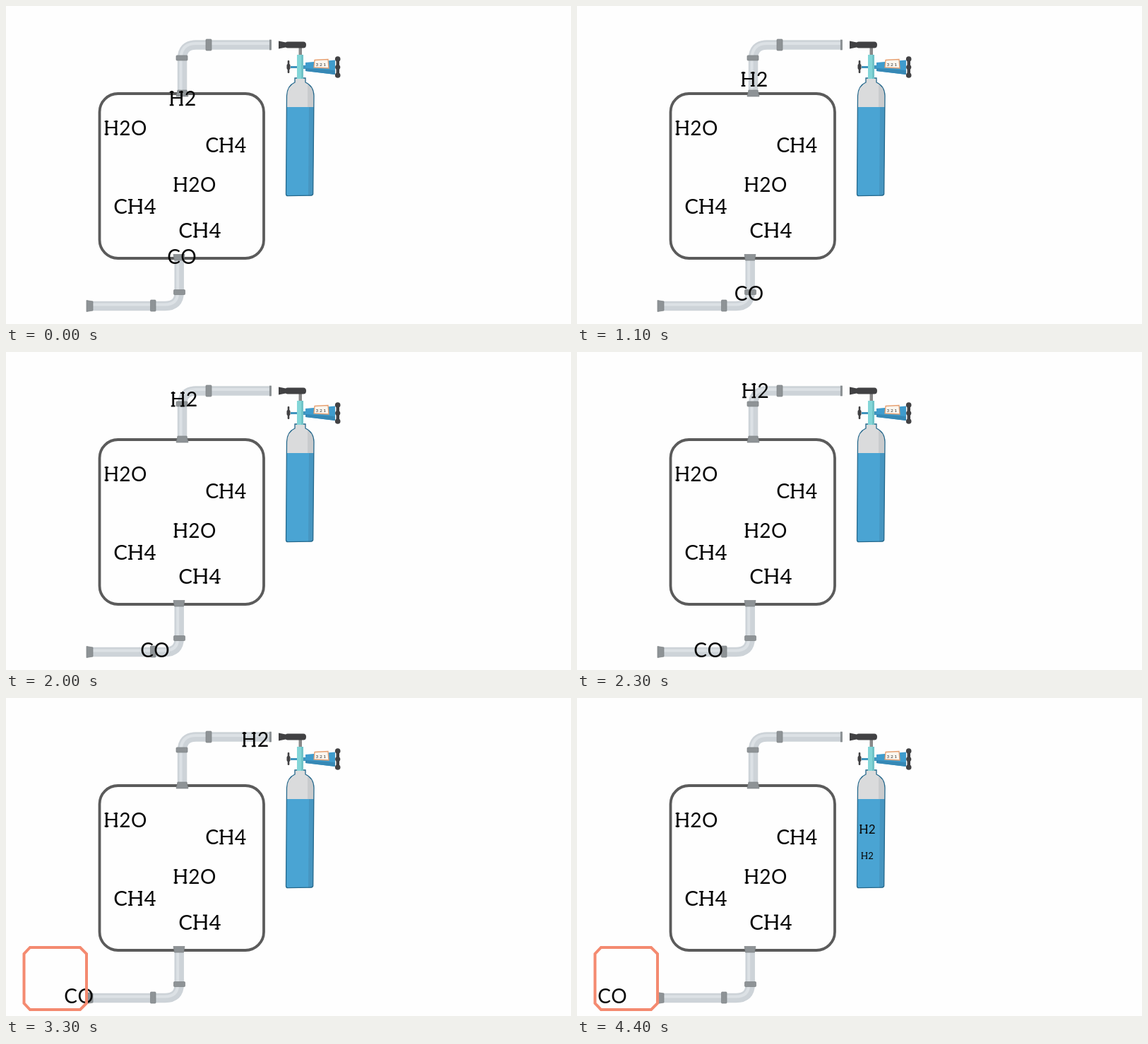
An HTML page that plays this animation: 800x450 px, repeating every 5000 ms.

```html
<!DOCTYPE html>
<html lang="en">
<head>
<meta charset="utf-8">
<title>Gas reactor</title>
<style>
html, body { margin: 0; width: 100%; height: 100%; overflow: hidden; background: #fefefe; }
svg { display: block; width: 100vw; height: 100vh; }
text { font-family: Lato, "Open Sans", sans-serif; font-kerning: none; }
</style>
</head>
<body>
<svg id="stage" viewBox="0 0 800 450">
  <rect x="132.500" y="124" width="232.500" height="233" rx="26" fill="none" stroke="#5b5b5b" stroke-width="3.800"/>

  <g id="pipes" fill="none">
    <g stroke="#cdd3d8" stroke-width="13.500">
      <path d="M249.500 122V75Q249.500 55 269 55H374"/>
      <path d="M245.200 357V405Q245.200 424.500 225 424.500H120"/>
    </g>
    <g stroke="#dce1e5" stroke-width="4">
      <path d="M247.500 120V75Q247.500 53 269 53H374"/>
      <path d="M243.200 359V405Q243.200 422.500 225 422.500H120"/>
    </g>
    <g fill="#8e9396" stroke="#7d8285" stroke-width=".7">
      <rect x="241" y="70" width="16" height="7" rx="1"/>
      <rect x="283" y="47" width="8" height="16" rx="1"/>
      <path d="M243 119H256L258 128H241Z"/>
      <rect x="373.300" y="48" width="2.200" height="14"/>
      <path d="M237 351.500H253L251.500 360H238.500Z"/>
      <rect x="237.500" y="401.500" width="16" height="7" rx="1"/>
      <rect x="204.500" y="416" width="7.500" height="16" rx="1"/>
      <path d="M114 416.500L123 418V431L114 432.500Z"/>
    </g>
  </g>

  <defs>
    <path id="shell" d="M409 102H424V108Q435.500 113 436 127L434.700 266Q434 268.200 431 268.200L399 268.700Q396.500 268.700 396.500 266L397.500 127Q398 113 409 108Z"/>
    <clipPath id="body"><use href="#shell"/></clipPath>
  </defs>
  <g id="cylinder">
    <g clip-path="url(#body)">
      <rect x="394" y="100" width="45" height="44" fill="#dadbdc"/>
      <path d="M427 100H439V144H427Z" fill="#c9cbcd"/>
      <rect x="394" y="143" width="45" height="128" fill="#4aa4d3"/>
      <path d="M429 143H439V271H428Z" fill="#4796c1"/>
    </g>
    <use href="#shell" fill="none" stroke="#25688c" stroke-width="1.300"/>
    <rect x="414.500" y="58" width="4.500" height="12" fill="#888"/>
    <path d="M403 85H412V88H403ZM421 84H426V89H421Z" fill="#3f94bd"/>
    <rect x="412" y="69" width="9" height="34" fill="#82d5d7"/>
    <rect x="418" y="69" width="3" height="34" fill="#70c3c7"/>
    <g fill="#414143">
      <path d="M386 49.500L396 51.500Q397 50.500 399 50.500H421Q425 50.500 425 55T421 59.500H399Q397 59.500 396 58.500L386 60.500Z"/>
      <rect x="398.700" y="77" width="2.600" height="18" rx="1"/>
      <rect x="397.500" y="82" width="5" height="8" rx="2"/>
      <rect x="467.500" y="75" width="4.500" height="23"/>
      <circle cx="469.700" cy="75" r="3.800"/>
      <circle cx="469.700" cy="86.500" r="3.600"/>
      <circle cx="469.700" cy="98" r="3.800"/>
    </g>
    <path d="M424 80L466 76.500V97L424 92Z" fill="#3f9ccd"/>
    <path d="M424 88L466 91V97L424 92Z" fill="#3688b5"/>
    <path d="M437 76.500L456 75.500L457 88L436 87Z" fill="#faf6ef" stroke="#e7a071" stroke-width="1.300"/>
    <text x="438.500" y="84.500" font-size="6.500" fill="#333">3 2 1</text>
  </g>

  <g id="labels"></g>
  <path id="tank" d="M34 353H105L114 362V432L105 441H34L25.500 432V362Z" fill="none" stroke="#f48a70" stroke-width="4"/>
</svg>
<script>
const NS = "http://www.w3.org/2000/svg";
const LOOP = 5000, STEP = 100, INK = "#080808";
const ADVANCE = { C: .652, H: .743, O: .79, 2: .58, 4: .58 };
const SPACING = .015;
const layer = document.getElementById("labels");
const tank = document.getElementById("tank");

function add(parent, tag, attrs) {
  const node = document.createElementNS(NS, tag);
  for (const key in attrs) node.setAttribute(key, attrs[key]);
  parent.append(node);
  return node;
}

// Slab feet, in em, laid over the plain letterforms.
function slabs(word) {
  let pen = 0, d = "";
  for (const ch of word) {
    if (ch === "H") {
      for (const x of [.04, .505])
        for (const y of [-.034, -.683]) d += `M${pen + x} ${y}h.2`;
    }
    if (ch === "4") d += `M${pen + .32} -.034h.2`;
    pen += ADVANCE[ch] + SPACING;
  }
  return d;
}

function label(word, x, y, size = 28) {
  const group = add(layer, "g", { fill: INK });
  add(group, "text", { "font-size": size, "letter-spacing": SPACING * size }).textContent = word;
  add(group, "path", {
    d: slabs(word), transform: `scale(${size})`,
    stroke: INK, "stroke-width": .068, fill: "none"
  });
  const place = (left, middle) =>
    group.setAttribute("transform", `translate(${left - .03 * size} ${middle + .358 * size})`);
  place(x, y);
  return { group, place };
}

label("H2O", 139.3, 172.5);
label("CH4", 283, 197, 28.5);
label("H2O", 237.3, 252.5);
label("CH4", 153.2, 283.5, 29.5);
label("CH4", 245.2, 317, 29.5);
const hydrogen = label("H2", 231.5, 131, 28.5);
const monoxide = label("CO", 228, 355);
const upper = label("H2", 400, 185.5, 17);
const lower = label("H2", 402.5, 223, 13);

const clamp = (v, lo = 0, hi = 1) => Math.min(hi, Math.max(lo, v));
const ramp = (t, from, to) => clamp((t - from) / (to - from));
const mix = (a, b, k) => a + (b - a) * k;
const fade = (node, k) => node.setAttribute("opacity", k);

function draw(t) {
  const rise = ramp(t, 430, 2400);
  if (t < 2500) hydrogen.place(mix(231.5, 234, rise), mix(131, 51, rise));
  else hydrogen.place(262.3 + (t - 2700) * .12, 59);
  fade(hydrogen.group, t <= 4000 ? 1 : 0);

  const fall = ramp(t, 0, 1420);
  const slide = ramp(t, 1627, 3940);
  monoxide.place(mix(mix(229, 222, fall), 30, slide), mix(355, 422, fall));

  fade(tank, ramp(t, 2700, 3000));
  fade(lower.group, ramp(t, 3800, 4100));
  fade(upper.group, ramp(t, 4100, 4400));
}

const start = performance.now();
function tick() {
  const t = (performance.now() - start) % LOOP;
  draw(Math.floor(t / STEP) * STEP);
  requestAnimationFrame(tick);
}
draw(0);
requestAnimationFrame(tick);
</script>
</body>
</html>
```
